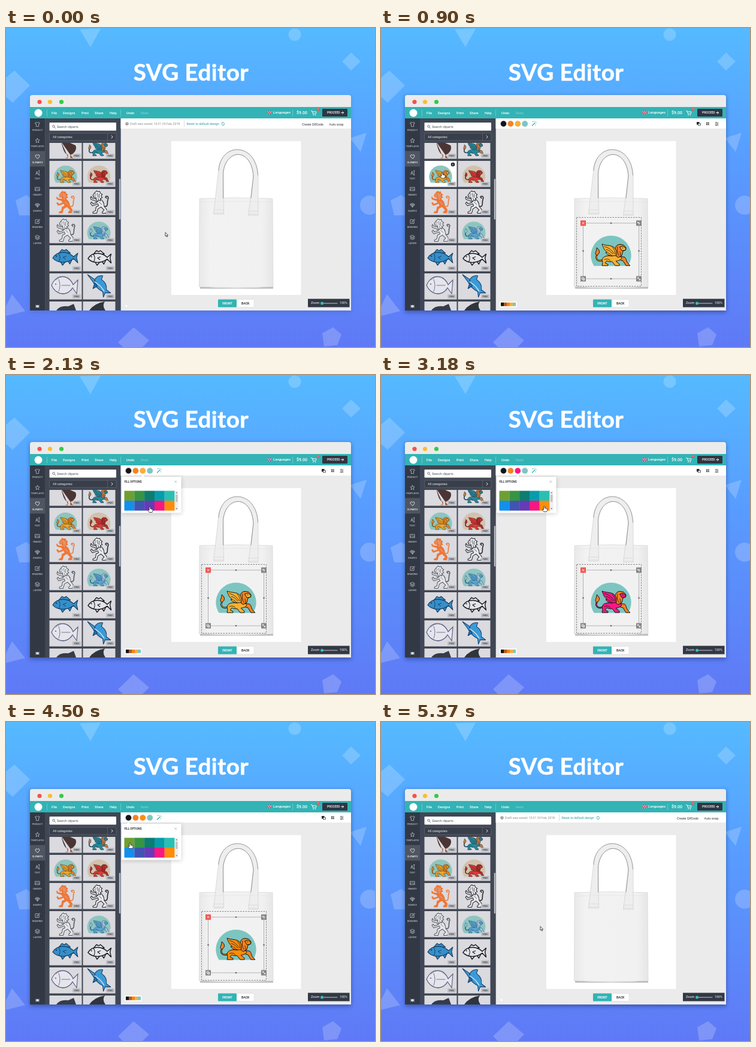
An HTML page that plays this animation: 616 px wide and 533 px high, repeating every 5.4 s.

```html
<!DOCTYPE html>
<html lang="en">
<head>
<meta charset="utf-8">
<title>SVG Editor</title>
<style>
html, body { margin: 0; width: 100%; height: 100%; overflow: hidden; background: #58a4ff; }
svg { display: block; width: 616px; height: 533px; }
text { font-family: Roboto, sans-serif; }
.ln { fill: none; stroke-linecap: round; stroke-linejoin: round; }
</style>
</head>
<body>
<svg id="stage" viewBox="0 0 616 533" xmlns="http://www.w3.org/2000/svg"></svg>
<script>
const LOOP = 5400;
const TEAL = '#33b3b5', DARK = '#323945', PANEL = '#414753';
const BLACK = '#111519', ORANGE = '#f58220', YELLOW = '#f9b031', AQUA = '#7dc5c1';
const PINK = '#f7197f', AMBER = '#ff8c0a', GREEN = '#6f9f32';

const rect = (x, y, w, h, fill, more = '') =>
  `<rect x="${x}" y="${y}" width="${w}" height="${h}" fill="${fill}" ${more}/>`;
const dot = (x, y, r, fill, more = '') =>
  `<circle cx="${x}" cy="${y}" r="${r}" fill="${fill}" ${more}/>`;
const text = (x, y, size, str, fill, more = '') =>
  `<text x="${x}" y="${y}" font-size="${size}" fill="${fill}" ${more}>${str}</text>`;
const fill = (d, color, more = '') => `<path d="${d}" fill="${color}" ${more}/>`;
const line = (d, color, w = 0.8, more = '') =>
  `<path class="ln" d="${d}" stroke="${color}" stroke-width="${w}" ${more}/>`;
const group = (id, body, more = '') => `<g ${id ? `id="${id}"` : ''} ${more}>${body}</g>`;
const place = (x, y, s, body) => group('', body, `transform="translate(${x} ${y}) scale(${s})"`);

// Winged lion, drawn in stage coordinates around (384, 372)
function griffin(body, wing, disc, ink) {
  const edge = `stroke="${ink}" stroke-width="1" stroke-linejoin="round"`;
  return fill('M355.5 397.5 C350 388 349 379 352 370 C357 355 370 347 384 347 C398 347 411 355 416 370 C419 379 418 388 412.5 397.5Z', disc) +
    line('M370 388 C361 391 357 385 361 378', ink, 2.6) + line('M370 388 C361 391 357 385 361 378', body, 1) +
    fill('M360 380 C355 376 361 373 360 367 C366 371 366 377 360 380Z', wing, edge) +
    fill('M398 381 L407 383 C410 386 409 390 413 394 L416 397 H409 L404 389 L397 387Z', wing, edge) +
    fill('M369 388 C370 381 377 380 386 381 L393 377 C396 383 400 381 402 384 C401 388 395 389 392 389.5 L398 394.5 V397 H391 L386 390.5 C382 391 379 390 377 389 L374 392.5 L379 395 V397 H369 L370 392Z', body, edge) +
    fill('M391 380 C389 372 391 361 399 361.5 L405 362.5 L409 367 L408.5 371 L404 372.5 L402 380 L396 383.5Z', wing, edge) +
    fill('M398.5 366 L404 364.5 L409 368 L407.5 371.5 L402 372Z', body, edge) +
    fill('M393 380 C383 382 377 379 375 375 L378 375 C373 372 371 367 369 361 C379 365 389 361 393 373Z', body, edge) +
    line('M373 365 Q384 368 389 377 M376 370 Q383 372 387 378 M379 375.5 Q382 376.5 385 380 M386 366 Q391 371 391 378', ink, 0.8) +
    line('M395 366 Q393 373 397 380 M399 374 L400 380 M373 387 Q379 384 383 389', ink, 0.8) +
    dot(403.5, 367.5, 0.7, ink);
}

// Rearing lion, about 30 x 36 units
function lion(color, ink) {
  const edge = `stroke="${ink}" stroke-width="1" stroke-linejoin="round"`;
  const inner = ink === 'none' ? '#d4d0d2' : ink;
  return line('M21 25 C30 27 26 19 28 14 C30 9 26 7 24 10 L26 12', ink === 'none' ? color : ink, 1.5) +
    fill('M9 13 L3 12 L1 9 L0 11 L1 14 L8 16 L10 19 L4 21 L2 18 L0 20 L3 24 L12 21 L13 24 L9 26 L8 32 L4 34 V36 H10 L12 29 L17 26 L22 31 L19 34 V36 H25 L26 30 L22 25 C22 18 18 14 14 12Z', color, edge) +
    fill('M7 3 L10 0 L12 1.5 L15 1 L16 4 L19 6 L17 8 L19 11 L16 12 L16 16 L13 15 L11 18 L9 13 L9 11 L5 10.5 L4 7Z', color, edge) +
    line('M7 5 L9 5.5 M5.5 8.5 L8.5 8 M11 4 L12 10 M14 5 L14 11 M12 12 L13 14 M14 18 L18 22', inner, 0.7);
}

// Side view of a fish, about 42 x 26 units
function fish(color, ink, w) {
  const edge = `stroke="${ink}" stroke-width="${w}" stroke-linejoin="round"`;
  return fill('M11 6 L16 0 L20 2 L23 0 L30 6Z M13 19 L17 26 L22 20Z M26 19 L29 24 L33 16Z', color, edge) +
    fill('M1 14 C8 2 25 2 35 12 L42 6 L40 13 L42 22 L35 15 C25 23 9 23 1 14Z', color, edge) +
    line('M11 7 Q15 13 11 20 M18 13 L23 11 M18 13 L22 16', ink, w * 0.8) + dot(7, 11, 1.1, ink);
}

function marlin() {
  const edge = 'stroke="#173a63" stroke-width="1" stroke-linejoin="round"';
  return fill('M1 1 L13 9 C16 4 20 2 26 3 L24 9 C31 14 33 20 32 26 L39 31 L30 31 L27 38 L26 29 C18 25 13 19 10 13Z', '#3b9ad6', edge) +
    fill('M13 14 L10 24 L17 20Z', '#2470ad', edge) + line('M13 13 Q23 19 28 28', '#d7edf7', 1.4) + dot(13, 11, 1, '#123');
}

function backdrop() {
  const shapes = ['M123 2 L158 1 L141 32Z', 'M576 41 L592 56 L576 71 L561 56Z',
    'M14 71 L40 96 L11 125 L0 115 V83Z', 'M574 184 L602 175 L592 207Z',
    'M16 288 L34 279 L48 290 L43 313 H22Z', 'M10 445 L32 473 L0 481 V465Z',
    'M213 500 L239 522 L228 533 H195 L187 525Z', 'M528 510 L546 500 L560 512 L553 530 L531 532Z'];
  return rect(0, 0, 616, 533, 'url(#sky)') +
    group('', shapes.map(d => fill(d, '#fff')).join('') + dot(482, 11, 10.5, '#fff') + dot(607, 296, 16, '#fff'), 'opacity=".2"') +
    text(309, 87.5, 38.5, 'SVG Editor', '#fff', 'text-anchor="middle" stroke="#fff" stroke-width=".6" style="font-family:Lato,sans-serif;font-weight:700;letter-spacing:.5px"');
}

function header() {
  const menu = [[76, 'File'], [95, 'Designs'], [126, 'Print'], [148, 'Share'], [173, 'Help'], [201, 'Undo']];
  return fill('M40 132 V116 Q40 112 44 112 H572 Q576 112 576 116 V132Z', '#ebebeb') +
    dot(56, 123.5, 3.6, '#f4524c') + dot(73.5, 123.5, 3.6, '#fbbd2e') + dot(92.5, 123.5, 3.6, '#35cb4b') +
    rect(40, 132, 536, 19, TEAL) + dot(54, 142, 6.5, '#fff') +
    menu.map(([x, s]) => text(x, 143.5, 5.7, s, '#fff', 'font-weight="500"')).join('') +
    text(225, 143.5, 5.7, 'Redo', '#8ad3d3') +
    line('M68.5 137 V147 M191.5 137 V147 M478.5 137 V147', '#86d0d1', 0.7) +
    rect(436, 138.5, 8, 5.5, '#2c3f86') + line('M436.5 139 L443.5 143.5 M443.5 139 L436.5 143.5', '#fff', 0.9) +
    line('M440 139 V143.5 M437 141.2 H443', '#fff', 1.8) + line('M440 138.7 V143.8 M436.5 141.2 H443.5', '#d8293c', 1) +
    text(446, 143.3, 5.9, 'Languages', '#fff', 'font-weight="500"') + text(485, 144, 7, '$9.00', '#fff', 'font-weight="500"') +
    line('M509.5 138.5 H511 L512.5 143.5 H517 L518 140 H511.5', '#fff', 0.9) + dot(513, 145.5, 0.8, '#fff') + dot(516.5, 145.5, 0.8, '#fff') +
    dot(521, 136, 2.4, '#ee4c49') + text(521, 137.2, 3.2, '0', '#fff', 'text-anchor="middle"') +
    rect(528, 135, 42, 13, '#2f3642', 'rx="1"') + text(536, 143.2, 4.9, 'PROCEED', '#fff', 'font-weight="500"') +
    line('M559.5 141.5 H563.5 M561.7 139.6 L563.6 141.5 L561.7 143.4', '#fff', 0.9);
}

function sidebar() {
  const tabs = [
    ['PRODUCT', 'M-4 -3 L-1.5 -4 Q0 -2 1.5 -4 L4 -3 L3.5 -1 H2.3 V4 H-2.3 V-1 H-3.5Z'],
    ['TEMPLATES', 'M0 -4 L1.2 -1.2 L4 -1 L1.9 1 L2.5 4 L0 2.4 L-2.5 4 L-1.9 1 L-4 -1 L-1.2 -1.2Z'],
    ['CLIPARTS', 'M0 3.5 L-3.5 0 C-5 -3 -1.5 -5 0 -2 C1.5 -5 5 -3 3.5 0Z'],
    ['TEXT', 'M-3 3 L-1 -3 L1 3 M-2 1 H0 M3 -4 V4 M2 -4 H4 M2 4 H4'],
    ['IMAGES', 'M-4 -3 H4 V3 H-4Z M-4 2 L-1 -1 L1 1 L2 0 L4 2'],
    ['SHAPES', 'M-2 -3 H2 L4 -1 L0 4 L-4 -1Z M-4 -1 H4 M-1 -1 L0 3 L1 -1'],
    ['DRAWING', 'M1 -3 H-4 V4 H3 V0 M-1 1 L3.5 -4 L4.5 -3 L0 1.5Z'],
    ['LAYERS', 'M0 -4 L4 -2 L0 0 L-4 -2Z M-4 0 L0 2 L4 0 M-4 2 L0 4 L4 2']];
  return rect(40, 151, 25.5, 321, DARK) + rect(40, 205.5, 25.5, 26, '#505661') +
    tabs.map(([name, d], i) => {
      const y = 161 + i * 27, c = i === 2 ? '#fff' : '#b9bdc4';
      return place(52.5, y, 0.9, line(d, c, 0.9)) +
        text(52.5, y + 11, 3.9, name, c, 'text-anchor="middle" font-weight="500"');
    }).join('') +
    dot(52.5, 465, 2.3, '#d5d8dc') + line('M49.5 463 L55.5 467 M49.5 467 L55.5 463 M49.3 465 H55.7', '#d5d8dc', 0.7);
}

function cliparts() {
  const cell = (col, row) => {
    const x = 72.5 + col * 56, y = 175 + row * 47;
    const id = col === 0 && row === 1 ? 'id="hot"' : '';
    return rect(x, y, 54, 43.5, '#dadadf', id);
  };
  const free = (col, row) => {
    const x = 111 + col * 56, y = 210 + row * 47;
    return rect(x, y, 14, 7, '#bfc0c5', 'rx="1"') +
      text(x + 7, y + 5, 4, 'FREE', '#3c3f45', 'text-anchor="middle" font-weight="500"');
  };
  let cells = '', tags = '';
  for (let row = 0; row < 7; row++) for (let col = 0; col < 2; col++) {
    cells += cell(col, row);
    tags += free(col, row);
  }
  const mini = (cx, cy, s, ...c) => place(cx - 384 * s, cy - 372 * s, s, griffin(...c));
  const art =
    fill('M92 190 C96 188 102 192 107 192 L116 196 C119 202 115 209 108 212 L107 217 H111 M104 217 L103 212 C96 209 95 200 92 190Z', '#4b3534') +
    line('M103 211 V217 H100 M108 211 V217 H112', '#c86a3a', 1) +
    mini(154, 198, 0.62, '#27879a', '#c67a3f', '#dadadf', '#1e3442') +
    mini(99.5, 244, 0.57, '#f0a52c', '#e98627', '#8ec5bd', '#402c17') +
    mini(155, 244, 0.57, '#dc3d35', '#b62c2e', '#d2c2ac', '#3b1a1c') +
    place(84, 272, 1.04, lion('#ee7738', 'none')) + place(141, 272, 1.04, lion('#e9e9ec', '#25272d')) +
    place(85, 319, 1.04, lion('#e6e6ea', '#555962')) +
    mini(155, 338, 0.58, '#5ba4d1', '#a8cbe0', '#8ec5c0', '#244b72') +
    place(77, 370, 1.02, fish('#358fc9', '#163a5d', 1.1)) + place(136, 372, 0.94, fish('#e4e4e8', '#17191e', 1.5)) +
    fill('M76 430 C84 411 104 410 112 429 L120 421 L118 444 L111 434 C102 449 84 447 76 430Z', '#e5e5ec', 'stroke="#555b7d" stroke-width="1.1"') +
    line('M83 421 Q97 408 111 426 M84 440 Q96 450 110 437 M88 420 Q92 430 88 440 M93 430 H107', '#555b7d', 0.8) + dot(83, 428, 0.9, '#444a68') +
    place(135, 411, 1.02, marlin()) +
    fill('M84 472 Q90 463 104 465 L113 461 L117 472Z', '#353c48') +
    fill('M139 472 Q147 460 165 457 Q160 464 166 472Z', '#30353c');
  return rect(65.5, 151, 126, 321, PANEL) +
    rect(72.5, 158, 111.5, 13.5, '#fff', 'rx="1"') + dot(79.5, 164.3, 1.8, 'none', 'stroke="#555" stroke-width=".8"') +
    line('M81 166 L82.5 167.5', '#555') + text(85, 166.8, 5.4, 'Search cliparts', '#4b5058') +
    rect(72.5, 176, 111.5, 12, '#383e4a', 'rx="1" stroke="#6b717b" stroke-width=".6"') +
    line('M169.5 176 V188', '#6b717b', 0.6) + line('M176 179.8 L178.2 182 L176 184.2', '#fff', 0.9) +
    text(78, 184, 5.4, 'All categories', '#eceef0') +
    group('', cells + art + tags + group('info', dot(120, 228, 3.3, '#23272e') +
      text(120, 230, 5, 'i', '#fff', 'text-anchor="middle" font-weight="700"')), 'clip-path="url(#list)"') +
    rect(188.8, 252, 2.2, 68, '#b9bcc3', 'rx="1"');
}

function bag() {
  return rect(276, 189, 216.5, 257, '#fff') +
    fill('M324 432 Q384 437 446 432 V435.5 H324Z', '#b9b9b9') +
    fill('M323 285 Q384 282 445 285 L446 432.5 Q384 435 322.5 432.5Z', 'url(#cloth)', 'stroke="#d6d6d6" stroke-width=".7"') +
    rect(323, 284, 122.5, 149, 'url(#weave)') +
    fill('M346.500 311 L354.500 240 C356 191 420 189 421 250 V313 H404.500 L413 248 C410 199 366 201 362.500 243 L363.500 311Z', '#eeeeee', 'stroke="#cdcdcd" stroke-width=".7"') +
    line('M362.5 284 V243 C366 201 410 199 413 248 L409 284', '#8c8c8c', 0.9) +
    line('M355 238 C358 190 418 190 420.5 246', '#8a8a8a', 0.8) +
    line('M347 304 H363 M347 309 H363 M405 306 H421 M405 311 H421', '#d2d2d2', 0.6) +
    line('M323 291 Q384 288 446 291', '#e2e2e2', 0.6);
}

function design() {
  const handle = (x, y, c, d) => rect(x - 4.5, y - 4.5, 9, 9, c) + place(x, y, 1, line(d, '#fff', 0.9));
  return rect(326.5, 316.5, 108, 115, 'none', 'stroke="#777" stroke-width=".9" stroke-dasharray="2.5 1.8"') +
    rect(337.5, 326, 93, 93, 'none', 'stroke="#a2a2a2" stroke-width=".8"') +
    group('art', griffin('var(--body)', ORANGE, AQUA, 'var(--ink)')) +
    [[384, 326], [337.5, 372.5], [430.5, 372.5], [384, 419]].map(([x, y]) => dot(x, y, 1.3, '#666')).join('') +
    handle(337.5, 326, '#f2534d', 'M-1.7 -1.7 L1.7 1.7 M1.7 -1.7 L-1.7 1.7') +
    handle(430.5, 326, '#858585', 'M-1.8 -1.8 V0 H0 M-1.5 -.5 C1 -3 3 1 0 2.2') +
    handle(337.5, 419, '#858585', 'M-2 -2 H.7 V.7 H-2Z M1.5 -.6 H2.2 V2.2 H-.6 V1.5') +
    handle(430.5, 419, '#858585', 'M-2 -2 L2 2 M-2 -.3 V-2 H-.3 M2 .3 V2 H.3') +
    rect(198.5, 457, 28, 9.5, '#fff') +
    [BLACK, '#b85a18', ORANGE, YELLOW, AQUA].map((c, i) => rect(200 + i * 5, 458.7, 5, 6, c)).join('');
}

function bars() {
  const plain = dot(202, 160, 2.7, '#999') + line('M202 158.5 V160 H203', '#fff', 0.6) +
    text(207, 162, 5.2, 'Draft was saved: 10:31 24 Feb, 2018', '#8b8b8b') + line('M297.5 155 V165', '#ccc', 0.7) +
    text(301.5, 162, 5.3, 'Reset to default design', '#299c9f') +
    line('M360 160 A2.3 2.3 0 0 1 364 158.5 M364.5 160 A2.3 2.3 0 0 1 360.5 161.7', '#299c9f', 1) +
    text(494, 162.5, 5.3, 'Create QRCode', '#30343a') + text(539.5, 162.5, 5.3, 'Auto snap', '#30343a') +
    dot(201, 464.5, 1.8, '#fff');
  const tools = ['var(--ink)', ORANGE, 'var(--body)', AQUA].map((c, i) =>
      dot(204.5 + i * 11.9, 160, 5, c, 'stroke="#ddd" stroke-width=".5"')).join('') +
    line('M252.5 163 L257 158.5', '#22a9a4', 1.2) + line('M257 155.8 V156.5 M259 158 H259.7 M253 156.5 H254.5 M258 161 V162', '#22a9a4', 0.8) +
    rect(527, 157, 4.5, 4.5, '#23272d') + rect(529.5, 159.5, 3.8, 3.2, '#fff', 'stroke="#23272d" stroke-width=".7"') +
    [0, 1, 2, 3].map(i => rect(543 + (i % 2) * 2.7, 157.5 + (i >> 1) * 2.7, 2, 2, '#444')).join('') +
    line('M558 158 H563 M558 160.3 H563 M558 162.5 H563 M559.5 157.2 V158.8 M561.7 159.5 V161 M559.5 161.7 V163.3', '#444', 0.7);
  return rect(191.5, 151, 384.5, 17, '#fff') + group('plain', plain) + group('tools', tools);
}

function footer() {
  return rect(354, 453.5, 60, 13, '#fff', 'rx="1" stroke="#d5d5d5" stroke-width=".5"') + rect(354, 453.5, 31, 13, TEAL, 'rx="1"') +
    text(369.5, 462, 5.2, 'FRONT', '#fff', 'text-anchor="middle" font-weight="700"') +
    text(399.7, 462, 5.2, 'BACK', '#33383f', 'text-anchor="middle" font-weight="700"') +
    rect(504, 452.5, 69.5, 14, DARK) + text(509, 461.3, 5.5, 'Zoom', '#fff') +
    line('M527 460 H553', '#d7dade', 0.9) + dot(527.5, 460, 2.5, '#2fc1bf') + text(557, 461.3, 5.3, '100%', '#fff');
}

function popup() {
  const colors = ['#6f9f32', '#379443', '#0d7d70', '#079cad', '#2abfb3', '#1290ee', '#4054b2', '#673ab7', PINK, AMBER];
  return rect(193, 171, 100, 61, '#000', 'opacity=".18" filter="url(#soft)"') +
    rect(193, 170, 99.5, 60.5, '#fff', 'rx="1"') + fill('M202 170 L204.5 167 L207 170Z', '#fff', 'id="tip"') +
    text(197.5, 180.3, 4.5, 'FILL OPTIONS', '#30343a', 'font-weight="700"') +
    line('M281.5 176.5 L285 180 M285 176.5 L281.5 180', '#9a9ea5', 0.6) +
    colors.map((c, i) => rect(197.5 + (i % 5) * 16.8, 193.5 + (i / 5 | 0) * 16.5, 16.9, 16.6, c)).join('') +
    rect(281.7, 193.5, 6, 33, '#f0f0f0') + rect(283, 200, 3.5, 12, '#c4c4c4') +
    fill('M283.3 197.5 L284.7 195.5 L286.1 197.5Z M283.3 222.5 L284.7 224.5 L286.1 222.5Z', '#666');
}

function loading() {
  return rect(40, 132, 536, 340, '#000', 'opacity=".34"') +
    rect(354, 295, 60, 15.5, '#fff') + dot(363, 302.7, 3.4, 'none', 'stroke="#ddd" stroke-width=".8"') +
    line('M363 299.3 A3.4 3.4 0 0 1 366.4 302.7', '#999', 0.8, 'id="spin"') +
    text(369.5, 304.3, 4.5, 'LOADING FONTS', '#3b4048', 'font-weight="500"');
}

function pointer() {
  const edge = 'stroke="#222" stroke-width=".8" stroke-linejoin="round"';
  return group('cursor',
    group('arrow', fill('M0 0 V6.5 L1.5 5.2 L2.6 7.6 L3.7 7 L2.7 4.8 H4.6Z', '#fff', edge)) +
    group('hand', fill('M-1 0 Q0 -1 1 0 V3 L4 3.7 Q5 4 5 5 V7 L4 9 H-1 L-3.5 5.5 Q-3 4.3 -1 5.7Z', '#fff', edge)));
}

document.getElementById('stage').innerHTML = `<defs>
  <linearGradient id="sky" x1="0" y1="0" x2="0" y2="1"><stop stop-color="#55baff"/><stop offset=".4" stop-color="#589dff"/><stop offset="1" stop-color="#5f79f6"/></linearGradient>
  <linearGradient id="cloth"><stop stop-color="#e9e9e9"/><stop offset=".15" stop-color="#f4f4f4"/><stop offset=".85" stop-color="#f3f3f3"/><stop offset="1" stop-color="#e6e6e6"/></linearGradient>
  <pattern id="weave" width="4" height="4" patternUnits="userSpaceOnUse"><path d="M0 1 H1.5 M2 3 H3.5" stroke="#e4e4e4" stroke-width=".7"/></pattern>
  <filter id="soft" x="-20%" y="-20%" width="140%" height="140%"><feGaussianBlur stdDeviation="3.5"/></filter>
  <clipPath id="list"><rect x="66" y="192" width="122" height="280"/></clipPath>
  <clipPath id="win"><rect x="40" y="112" width="536" height="360"/></clipPath>
</defs>` + backdrop() +
  rect(40, 114, 536, 361, '#1c2b66', 'id="shade" filter="url(#soft)"') +
  group('app', header() + rect(191.5, 151, 384.5, 321, '#ebebeb') + sidebar() + cliparts() +
    bars() + bag() + group('design', design()) + footer() + group('popup', popup()) + group('loading', loading()) + pointer(),
    'clip-path="url(#win)"');

const el = id => document.getElementById(id);
const show = (id, on) => { el(id).style.display = on ? '' : 'none'; };
const within = (t, a, b) => t >= a && t < b;

// Pointer stops: time, x, y
const PATH = [[0, 266, 341.5], [30, 266, 341.5], [420, 102, 242], [900, 102, 242], [1170, 192, 208], [1350, 226.5, 160],
  [1560, 226.5, 160], [2130, 240, 220.5], [2430, 257, 219], [2670, 257, 219], [3160, 272.5, 219.5], [3330, 272.5, 219.5],
  [3600, 283, 177], [3780, 283, 177], [3900, 204.5, 160], [4080, 204.5, 160], [4440, 207, 202.5], [4680, 207, 202.5],
  [5160, 266, 341.5], [5400, 266, 341.5]];

function pointerAt(t) {
  const i = PATH.findIndex(p => p[0] > t);
  const [t0, x0, y0] = PATH[i - 1], [t1, x1, y1] = PATH[i];
  const k = (t - t0) / (t1 - t0), e = k * k * (3 - 2 * k);
  return [x0 + (x1 - x0) * e, y0 + (y1 - y0) * e];
}

function draw(t) {
  const edit = within(t, 900, 5190);
  const [x, y] = pointerAt(t);
  const hover = x < 127 && y < 266;
  const hand = hover || within(t, 1290, 4740);
  el('cursor').setAttribute('transform', `translate(${x.toFixed(2)} ${y.toFixed(2)})`);
  show('arrow', !hand);
  show('hand', hand);
  show('plain', !edit);
  show('tools', edit);
  show('design', edit);
  show('popup', within(t, 1560, 3600) || within(t, 4080, 5190));
  el('tip').setAttribute('transform', `translate(${t < 3600 ? 23.8 : 0} 0)`);
  show('loading', within(t, 630, 900));
  show('info', hover);
  el('hot').setAttribute('fill', hover ? '#fff' : '#dadadf');
  el('spin').setAttribute('transform', `rotate(${(t * 0.6) % 360} 363 302.7)`);
  el('shade').setAttribute('opacity', t < 690 ? 0.15 : 0.5);
  const css = el('app').style;
  css.setProperty('--body', t < 2460 ? YELLOW : t < 3330 ? PINK : AMBER);
  css.setProperty('--ink', t < 4620 ? BLACK : GREEN);
}

const start = performance.now();
function tick() {
  draw((performance.now() - start) % LOOP);
  requestAnimationFrame(tick);
}
draw(0);
requestAnimationFrame(tick);
</script>
</body>
</html>
```
